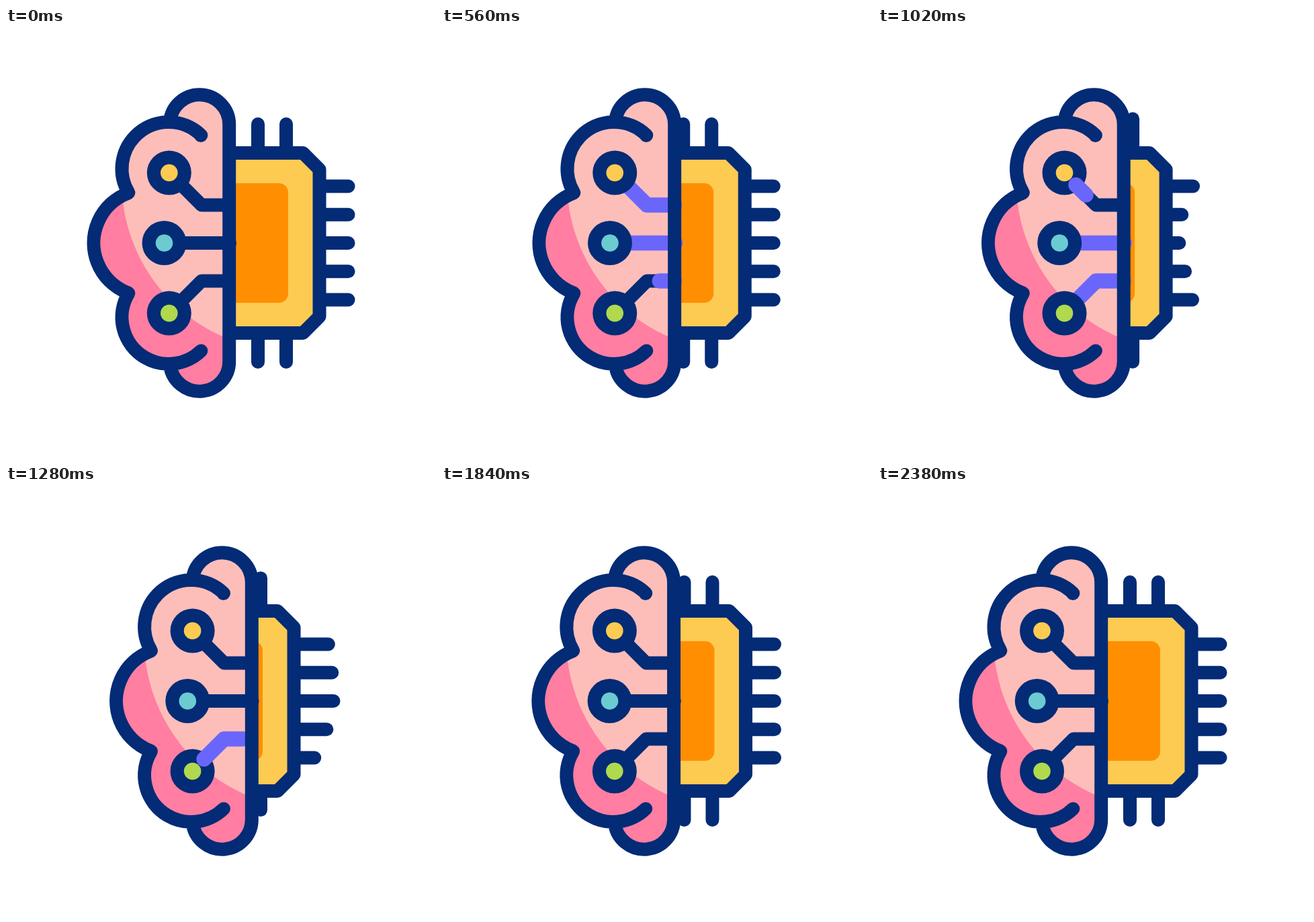
Animation, 640 px wide and 640 px high, one loop 2.4 s. Source, as an HTML page with a canvas:

```html
<!DOCTYPE html>
<html lang="en">
<head>
<meta charset="utf-8">
<title>Brain and chip</title>
<style>
  html, body { margin: 0; width: 100%; height: 100%; overflow: hidden; background: #fff; }
  canvas { display: block; }
</style>
</head>
<body>
<canvas id="stage" width="640" height="640"></canvas>
<script>
const LOOP = 2400;
const NAVY = '#032b76', PURPLE = '#6b66fb', YELLOW = '#fdcb52', ORANGE = '#ff8f00';
const LIGHT = '#fdbeb9', PINK = '#ff7ea1', TEAL = '#6bcbd1', GREEN = '#b0d94e';

const ctx = document.getElementById('stage').getContext('2d');
ctx.lineCap = ctx.lineJoin = 'round';

const progress = (t, start, length) => Math.min(1, Math.max(0, (t - start) / length));
const smooth = x => x * x * (3 - 2 * x);
const cubic = x => x < .5 ? 4 * x ** 3 : 1 - 4 * (1 - x) ** 3;

// Arc given by its centre and two points in whose directions it starts and ends.
function arc(path, cx, cy, r, x1, y1, x2, y2, ccw) {
  path.arc(cx, cy, r, Math.atan2(y1 - cy, x1 - cx), Math.atan2(y2 - cy, x2 - cx), ccw);
}

const silhouette = new Path2D();
arc(silhouette, 288, 143.5, 44.2, 333, 143.5, 244, 139, true);
arc(silhouette, 242, 209.5, 70, 244, 139, 181, 246, true);
arc(silhouette, 210, 320, 79.5, 181, 246, 181, 394, true);
arc(silhouette, 242, 430.5, 70, 181, 394, 244, 501, true);
arc(silhouette, 288, 496.5, 44.2, 244, 501, 333, 496.5, true);
silhouette.closePath();

const outline = new Path2D();
arc(outline, 288, 496.5, 44.2, 244, 501, 333, 496.5, true);
arc(outline, 288, 143.5, 44.2, 333, 143.5, 244, 139, true);
outline.moveTo(290, 160);
arc(outline, 242, 209.5, 69.5, 290, 160, 181, 246, true);
arc(outline, 210, 320, 79.5, 181, 246, 181, 394, true);
arc(outline, 242, 430.5, 69.5, 181, 394, 290, 480, true);

const chip = new Path2D('M332 186H442L466.5 210.5V429.5L442 454H332Z');

const wires = [
  { points: [[332, 263.5], [291, 263.5], [261, 233.5]], node: [244, 215.5], color: YELLOW },
  { points: [[333, 320], [258, 320]], node: [236.7, 320], color: TEAL },
  { points: [[332, 376.5], [291, 376.5], [261, 406.5]], node: [244, 424.5], color: GREEN }
];

function stroke(path, color = NAVY, width = 20) {
  ctx.strokeStyle = color;
  ctx.lineWidth = width;
  ctx.stroke(path);
}

function fill(path, color) {
  ctx.fillStyle = color;
  ctx.fill(path);
}

function segment(x1, y1, x2, y2) {
  const p = new Path2D();
  p.moveTo(x1, y1);
  p.lineTo(x2, y2);
  stroke(p);
}

function disc(x, y, r, color) {
  const p = new Path2D();
  p.arc(x, y, r, 0, 2 * Math.PI);
  fill(p, color);
}

// Part of a polyline between two fractions of its length.
function trim(points, from, to) {
  const p = new Path2D();
  const lengths = points.slice(1).map(([x, y], i) => Math.hypot(x - points[i][0], y - points[i][1]));
  const total = lengths.reduce((a, b) => a + b);
  let done = 0, started = false;
  lengths.forEach((len, i) => {
    const a = Math.max(0, (from * total - done) / len);
    const b = Math.min(1, (to * total - done) / len);
    done += len;
    if (a >= b) return;
    const [x1, y1] = points[i], [x2, y2] = points[i + 1];
    if (!started) p.moveTo(x1 + (x2 - x1) * a, y1 + (y2 - y1) * a);
    started = true;
    p.lineTo(x1 + (x2 - x1) * b, y1 + (y2 - y1) * b);
  });
  return p;
}

// A pin pulls in, springs out past its length, then settles.
function pinStretch(t, start, dip, rise) {
  return -dip * smooth(progress(t, start, 230))
    + (dip + rise) * smooth(progress(t, start + 230, 240))
    - rise * smooth(progress(t, start + 470, 300));
}

function drawChip(t) {
  const top = pinStretch(t, 625, 27, 18);
  const bottom = pinStretch(t, 1005, 18.5, 19);
  for (const x of [375, 417]) {
    segment(x, 186, x, 143 - top);
    segment(x, 454, x, 497 + bottom);
  }
  for (let i = 0; i < 5; i++) {
    const y = 235.5 + i * 42.25;
    segment(466.5, y, 509.5 + pinStretch(t, 665 + 75 * i, 24, 16), y);
  }
  fill(chip, YELLOW);
  const core = new Path2D();
  core.roundRect(300, 231, 120, 178, 14);
  fill(core, ORANGE);
  stroke(chip);
}

function drawSignals(t, leaving) {
  wires.forEach(({ points }, i) => {
    const outStart = 860 + 180 * i;
    if (t > outStart !== leaving) return;
    const head = smooth(progress(t, 120 + 180 * i, 240));
    const tail = smooth(progress(t, outStart, 240));
    if (head > tail) stroke(trim(points, tail, head), PURPLE, 22.5);
  });
}

function drawBrain(t, nodeShift) {
  fill(silhouette, PINK);
  ctx.save();
  ctx.clip(silhouette);
  disc(425, 228, 253, LIGHT);
  ctx.restore();

  for (const { points } of wires) stroke(trim(points, 0, 1));
  drawSignals(t, false);
  for (const { node: [x, y], color } of wires) {
    disc(x + nodeShift, y, 33, NAVY);
    disc(x + nodeShift, y, 12.8, color);
  }
  drawSignals(t, true);
  stroke(outline);
}

function shifted(dx, draw) {
  ctx.save();
  ctx.translate(dx, 0);
  draw();
  ctx.restore();
}

function frame(now) {
  const t = now % LOOP;
  const closing = cubic(progress(t, 77, 1030));
  const squeeze = closing - cubic(progress(t, 1244, 1100));
  ctx.fillStyle = '#fff';
  ctx.fillRect(0, 0, 640, 640);
  shifted(-38 * squeeze, () => drawChip(t));
  shifted(33.6 * squeeze, () => drawBrain(t, -1.2 * (1 - closing)));
  requestAnimationFrame(frame);
}
requestAnimationFrame(frame);
</script>
</body>
</html>
```
